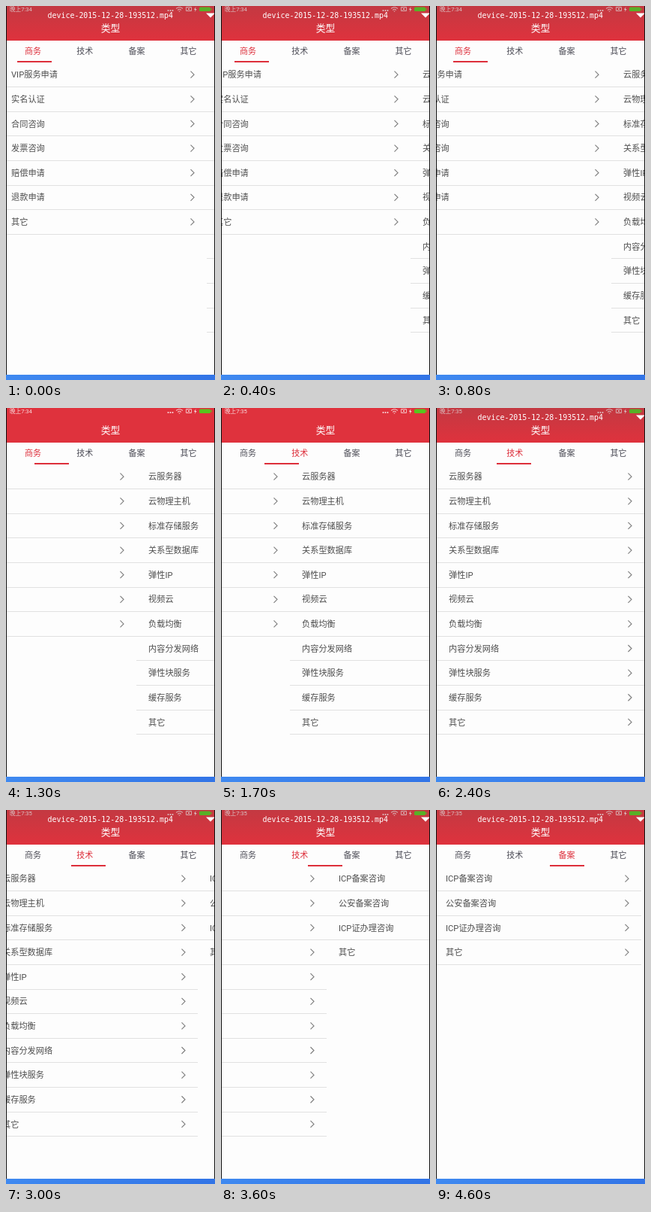
An HTML page for the animation above (4.7 s loop, 279 by 497 pixels).

```html
<!DOCTYPE html>
<html lang="zh-CN">
<head>
<meta charset="utf-8">
<style>
  html, body { margin: 0; width: 100%; height: 100%; overflow: hidden; background: #fdfdfd; }
  svg { display: block; width: 279px; height: 497px; }
  text { font-family: Roboto, "Noto Sans CJK SC", "Noto Sans CJK", sans-serif; }
  .row { font-size: 11.2px; fill: #4e4e4e; }
  .tab { font-size: 11px; fill: #4e4e58; text-anchor: middle; }
  .tab.active { fill: #dd2f3b; }
  .rule { stroke: #e1e1e1; stroke-width: 1; }
  .chevron { fill: none; stroke: #808080; stroke-width: 1.2; }
  .banner { font: 9.95px "DejaVu Sans Mono", monospace; fill: #fff; }
</style>
</head>
<body>
<svg viewBox="0 0 279 497">
  <defs>
    <linearGradient id="shade" x1="0" y1="0" x2="0" y2="1">
      <stop offset="0" stop-color="#555" stop-opacity=".2"/>
      <stop offset="1" stop-color="#555" stop-opacity="0"/>
    </linearGradient>
    <linearGradient id="footer">
      <stop offset="0" stop-color="#3f89f0"/>
      <stop offset="1" stop-color="#3274e6"/>
    </linearGradient>
    <clipPath id="screen"><rect x="1" y="76" width="277" height="414"/></clipPath>
  </defs>
  <rect width="279" height="497" fill="#fdfdfd"/>
  <g clip-path="url(#screen)"><g id="pages"></g></g>
  <g id="tabs"></g>
  <rect id="marker" y="73" width="46" height="2" fill="#dd2f3b"/>

  <rect width="279" height="46" fill="#df323d"/>
  <g fill="#f8dcde">
    <text id="clock" x="5" y="7.2" font-size="7.6"></text>
    <circle cx="216.5" cy="6" r="1"/><circle cx="219.5" cy="6" r="1"/><circle cx="222.5" cy="6" r="1"/>
    <path d="M253.5 1 251 5h1.6l-.8 3 2.8-4h-1.7z"/>
  </g>
  <g fill="none" stroke="#f8dcde">
    <path d="M227 3.4q4.5-3.4 9 0M229 5.3q2.5-2 5 0M230.8 7h1.4"/>
    <path d="M240.5 1.5h7v5h-7zM242.5 2.5l3 3m0-3-3 3" stroke-width=".8"/>
  </g>
  <rect x="258" y="1.5" width="15" height="5.5" rx="1.5" fill="#58c51d"/>
  <rect x="273.5" y="3" width="1.2" height="2.5" fill="#58c51d"/>
  <g id="overlay">
    <rect width="279" height="46" fill="url(#shade)"/>
    <text class="banner" x="55.5" y="15.6">device-2015-12-28-193512.mp4</text>
    <path d="M267 9.5h12l-6 6z" fill="#fff"/>
  </g>
  <text x="139.5" y="33.8" font-size="12.8" fill="#fff" text-anchor="middle">类型</text>

  <path d="M.5 0V490M278.5 0V490" stroke="#111"/>
  <rect y="490" width="279" height="7" fill="url(#footer)"/>
</svg>
<script>
const LOOP = 4700, STEP = 100, PAGE = 277, ROW = 32.62;
const tabNames = ['商务', '技术', '备案', '其它'];
const lists = [
  ['VIP服务申请', '实名认证', '合同咨询', '发票咨询', '赔偿申请', '退款申请', '其它'],
  ['云服务器', '云物理主机', '标准存储服务', '关系型数据库', '弹性IP', '视频云', '负载均衡',
    '内容分发网络', '弹性块服务', '缓存服务', '其它'],
  ['ICP备案咨询', '公安备案咨询', 'ICP证办理咨询', '其它']
];

// [time, scroll]; a third value marks a settle that eases out from there.
const scrollSteps = [
  [0, 10], [400, 25], [800, 44], [1000, 66], [1300, 104], [1640, 146, 1],
  [2500, 277], [2700, 277], [2900, 287], [3200, 322], [3400, 360], [3600, 414, 1],
  [4350, 554], [4500, 554], [4600, 558], [4700, 558]
];

const $ = id => document.getElementById(id);
function add(parent, tag, attrs, label = '') {
  const el = document.createElementNS('http://www.w3.org/2000/svg', tag);
  for (const key in attrs) el.setAttribute(key, attrs[key]);
  el.textContent = label;
  return parent.appendChild(el);
}

lists.forEach((rows, page) => {
  const group = add($('pages'), 'g', { transform: `translate(${page * PAGE} 0)` });
  rows.forEach((label, i) => {
    const y = 91.2 + i * ROW, ruleY = Math.round(107.1 + i * ROW) + .5;
    add(group, 'text', { class: 'row', x: 16, y: y + 4.1 }, label);
    add(group, 'path', { class: 'chevron', d: `M255.5 ${y - 4.5}l4.5 4.5-4.5 4.5` });
    add(group, 'path', { class: 'rule', d: `M0 ${ruleY}H${PAGE}` });
  });
});
const tabs = tabNames.map((name, i) =>
  add($('tabs'), 'text', { class: 'tab', x: 36 + i * 69.2, y: 64.3 }, name));

function scrollAt(t) {
  const next = scrollSteps.findIndex(step => step[0] > t);
  const [t0, s0, settles] = scrollSteps[next - 1], [t1, s1] = scrollSteps[next];
  const u = (t - t0) / (t1 - t0);
  return s0 + (s1 - s0) * (settles ? 1 - (1 - u) ** 5 : u);
}

function draw(t) {
  const scroll = scrollAt(t), current = Math.round(scroll / PAGE);
  $('pages').setAttribute('transform', `translate(${1 - Math.round(scroll)} 0)`);
  $('marker').setAttribute('x', Math.floor(12.5 + scroll / 4));
  tabs.forEach((tab, i) => tab.classList.toggle('active', i === current));
  $('clock').textContent = t < 1500 ? '晚上7:34' : '晚上7:35';
  $('overlay').style.display = t >= 1300 && t < 2400 ? 'none' : '';
}

const start = performance.now();
function frame() {
  const t = (performance.now() - start) % LOOP;
  draw(Math.floor(t / STEP) * STEP);
  requestAnimationFrame(frame);
}
frame();
</script>
</body>
</html>
```
